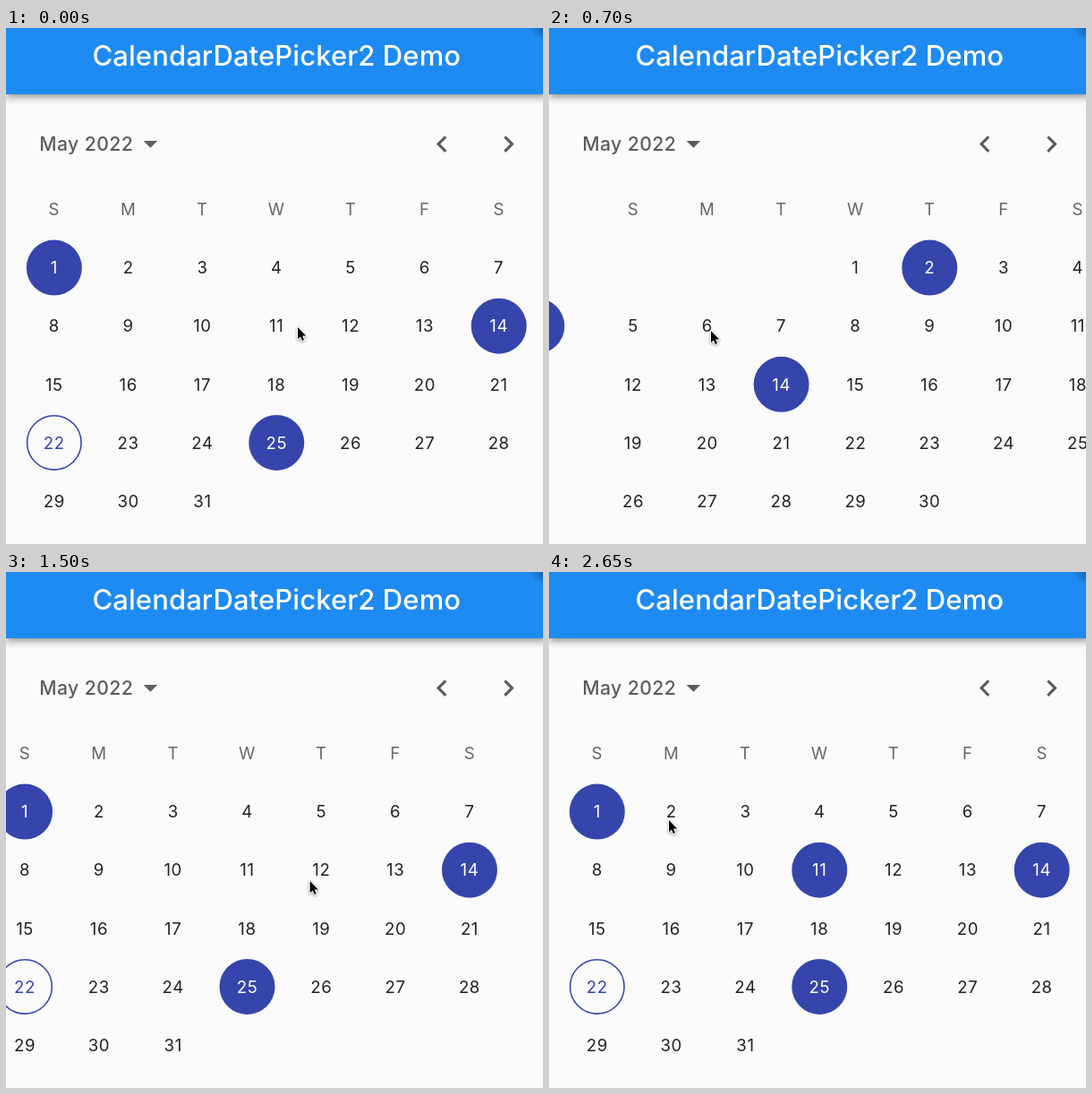
An HTML page with a canvas that plays this animation: 600x576 px, repeating every 2700 ms.

```html
<!DOCTYPE html>
<html lang="en">
<head>
<meta charset="utf-8">
<title>Calendar demo</title>
<style>
  html, body { margin: 0; width: 100%; height: 100%; overflow: hidden; background: #fafafa; }
  canvas { display: block; }
</style>
</head>
<body>
<canvas id="stage" width="600" height="576"></canvas>
<script>
const ctx = document.getElementById('stage').getContext('2d');

const LOOP = 2700, STEP = 50;
const UNIT = 1.55;                 // pixels per layout point
const PAGE = 390 * UNIT;
const COL = 374 / 7 * UNIT;
const ROW = 42 * UNIT;
const FIRST_X = 8 * UNIT + COL / 2;
const FIRST_Y = 267.6, WEEKDAY_Y = 202.6;
const CAP = 0.727;                 // cap height of Inter
const BLUE = '#1e8bf2', INDIGO = '#3645ab', PAPER = '#fafafa';
const INK = '#222', MUTED = '#666', HEADER = '#5c5c5c';

const SELECT_TIME = 2250;
const SWIPE_1 = { start: 346, release: 466.3, distance: 148, power: 3.5, velocity: 5800 };
const SWIPE_2 = { start: 1050, release: 1187, distance: 174, power: 1.95, velocity: 2200 };

// time, x, y of the pointer tip
const POINTER = [
  [0, 326, 334], [310, 326, 336], [430, 178, 337], [700, 181, 338],
  [1010, 181, 338], [1147, 355, 345], [1350, 344, 345], [1700, 333, 345],
  [2050, 306, 335], [2250, 306, 335], [2600, 134, 277], [2700, 134, 277]
];

const dropDown = new Path2D('M7 10l5 5 5-5z');
const chevronLeft = new Path2D('M15.41 7.41L14 6l-6 6 6 6 1.41-1.41L10.83 12z');
const chevronRight = new Path2D('M10 6L8.59 7.41 13.17 12l-4.58 4.59L10 18l6-6z');
const arrow = new Path2D('M0 0V13.2L3 10.4 4.9 14.9 7 14 5.1 9.6H9.2Z');

// Distance left on an overdamped spring, t in seconds after release.
function springRest(t, distance, velocity) {
  const slow = 9.07, fast = 22.03;
  const b = (velocity - slow * distance) / (fast - slow);
  return (distance - b) * Math.exp(-slow * t) + b * Math.exp(-fast * t);
}

function swipeProgress(time, { start, release, distance, power, velocity }) {
  if (time <= start) return 0;
  if (time < release) return distance * ((time - start) / (release - start)) ** power;
  return PAGE - springRest((time - release) / 1000, PAGE - distance, velocity);
}

function scrollAt(time) {
  return time < SWIPE_2.start
    ? swipeProgress(time, SWIPE_1)
    : PAGE - swipeProgress(time, SWIPE_2);
}

function pointerAt(time) {
  const i = POINTER.findIndex(key => key[0] > time);
  const [t0, x0, y0] = POINTER[i - 1], [t1, x1, y1] = POINTER[i];
  const u = (time - t0) / (t1 - t0);
  const e = u * u * (3 - 2 * u);
  return [x0 + (x1 - x0) * e, y0 + (y1 - y0) * e];
}

function text(str, x, midY, size, color, { weight = 400, spacing = 0, align = 'center' } = {}) {
  ctx.font = `${weight} ${size}px Inter, sans-serif`;
  ctx.letterSpacing = spacing + 'px';
  ctx.textAlign = align;
  ctx.fillStyle = color;
  ctx.fillText(str, x, midY + size * CAP / 2);
}

function caption(str, x, y, color) {
  text(str, x, y, 12 * UNIT, color, { spacing: 0.4 * UNIT });
}

function icon(path, x, y) {
  ctx.save();
  ctx.translate(x, y);
  ctx.scale(UNIT, UNIT);
  ctx.fillStyle = HEADER;
  ctx.fill(path);
  ctx.restore();
}

function drawDay(day, x, y, selected, today) {
  ctx.beginPath();
  ctx.arc(x, y, (today ? 19.5 : 20) * UNIT, 0, Math.PI * 2);
  if (selected) {
    ctx.fillStyle = INDIGO;
    ctx.fill();
  } else if (today) {
    ctx.strokeStyle = INDIGO;
    ctx.lineWidth = UNIT;
    ctx.stroke();
  }
  caption(String(day), x, y, selected ? '#fff' : today ? INDIGO : INK);
}

function drawMonth(left, { firstColumn, length, selected, today }) {
  if (left > 600 || left < -PAGE) return;
  const columnX = i => left + FIRST_X + i * COL;
  [...'SMTWTFS'].forEach((name, i) => caption(name, columnX(i), WEEKDAY_Y, MUTED));
  for (let day = 1; day <= length; day++) {
    const cell = firstColumn + day - 1;
    drawDay(day, columnX(cell % 7), FIRST_Y + Math.floor(cell / 7) * ROW,
      selected.includes(day), day === today);
  }
}

function drawHeader() {
  ctx.save();
  ctx.shadowColor = 'rgba(0,0,0,.42)';
  ctx.shadowBlur = 8;
  ctx.shadowOffsetY = 3;
  ctx.fillStyle = BLUE;
  ctx.fillRect(0, 0, PAGE, 74);
  ctx.restore();
  const corner = ctx.createRadialGradient(600, 0, 0, 600, 0, 14);
  corner.addColorStop(0, 'rgba(0,0,0,.3)');
  corner.addColorStop(1, 'rgba(0,0,0,0)');
  ctx.fillStyle = corner;
  ctx.fillRect(586, 0, 14, 14);
  text('CalendarDatePicker2 Demo', PAGE / 2, 30.8, 20 * UNIT, '#fff', { weight: 500, spacing: 0.1 });
  text('May 2022', 37.2, 129.6, 21.2, HEADER, { weight: 500, spacing: 0.4, align: 'left' });
  icon(dropDown, 142.8, 110.6);
  icon(chevronLeft, 468.5, 111);
  icon(chevronRight, 542.9, 111);
}

function drawPointer(x, y) {
  ctx.save();
  ctx.translate(x, y);
  ctx.lineJoin = 'round';
  ctx.lineWidth = 2;
  ctx.strokeStyle = '#fff';
  ctx.shadowColor = 'rgba(0,0,0,.4)';
  ctx.shadowBlur = 3;
  ctx.shadowOffsetY = 1;
  ctx.stroke(arrow);
  ctx.shadowColor = 'transparent';
  ctx.fillStyle = '#000';
  ctx.fill(arrow);
  ctx.restore();
}

function draw(time) {
  const scroll = scrollAt(time);
  ctx.fillStyle = PAPER;
  ctx.fillRect(0, 0, 600, 576);
  const maySelected = time >= SELECT_TIME ? [1, 11, 14, 25] : [1, 14, 25];
  drawMonth(-scroll, { firstColumn: 0, length: 31, selected: maySelected, today: 22 });
  drawMonth(PAGE - scroll, { firstColumn: 3, length: 30, selected: [2, 14] });
  drawHeader();
  drawPointer(...pointerAt(time));
}

const begin = performance.now();
function tick() {
  const elapsed = (performance.now() - begin) % LOOP;
  draw(Math.floor(elapsed / STEP) * STEP);
  requestAnimationFrame(tick);
}
tick();
</script>
</body>
</html>
```
